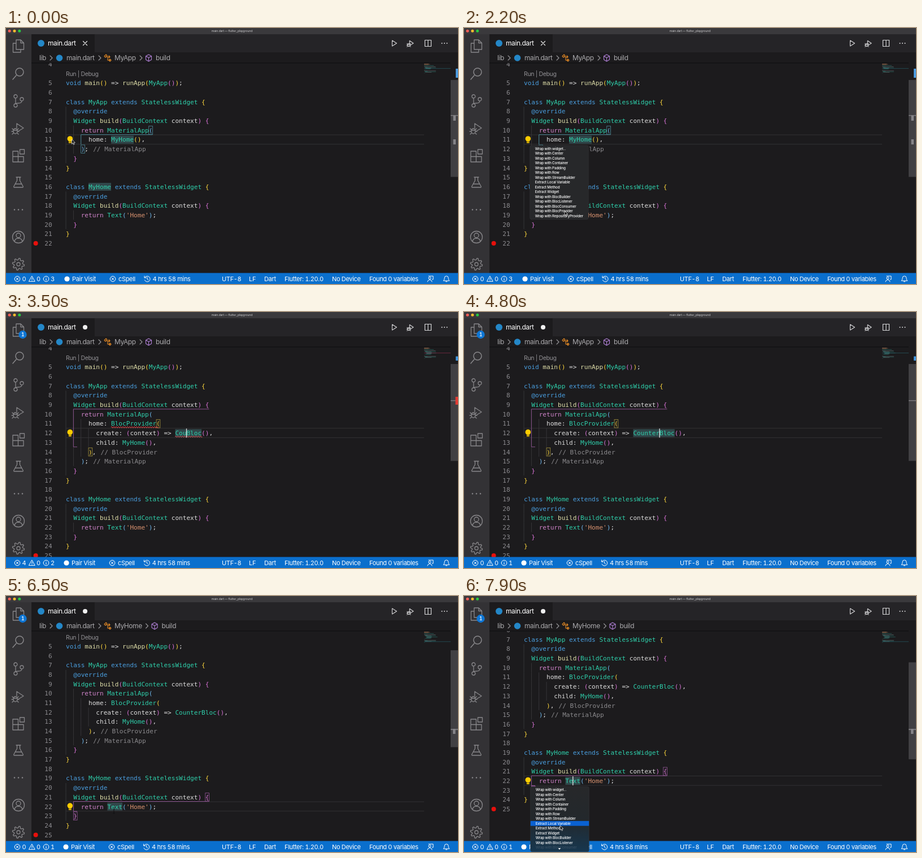
An HTML page that plays this animation: 800x453 px, repeating every 8000 ms.

```html
<!DOCTYPE html>
<html lang="en">
<head>
<meta charset="utf-8">
<title>Editor: wrap a widget</title>
<style>
  html, body { margin: 0; width: 100%; height: 100%; overflow: hidden; background: #1c1b1d; }
  svg { display: block; width: 100%; height: 100%; }
  text { white-space: pre; }
  .ui { font-family: Inter, "Open Sans", sans-serif; letter-spacing: -.03em; font-variant-numeric: tabular-nums; }
  .code { font: 11.08px "DejaVu Sans Mono", "Liberation Mono", monospace; }
  .line { fill: none; stroke-linecap: round; stroke-linejoin: round; }
</style>
</head>
<body>
<svg viewBox="0 0 800 453" preserveAspectRatio="none">
  <defs>
    <clipPath id="view"><rect x="45" y="62" width="755" height="372"/></clipPath>
    <linearGradient id="veil" x1="0" y1="0" x2="0" y2="1">
      <stop offset="0" stop-color="#27282a"/>
      <stop offset=".5" stop-color="#23282c"/>
      <stop offset="1" stop-color="#17374f"/>
    </linearGradient>
  </defs>
  <g id="chrome"></g>
  <g id="tab"></g>
  <g id="editor" clip-path="url(#view)"></g>
  <g id="status"></g>
  <g id="overlay"></g>
</svg>
<script>
const LOOP = 8000, STEP = 100;
const LEFT = 106, CH = 6.67, ROW = 16.68;
const WRAP = 2500, CLICK = 5900;
const GREY = '#88878a', LIGHT = '#d6d6d8';
const PAIRS = ['#ffd83d', '#d873d6', '#6fb8ee'];
const $ = id => document.getElementById(id);
const esc = s => s.replace(/&/g, '&amp;').replace(/</g, '&lt;').replace(/>/g, '&gt;');

const rect = (x, y, w, h, fill, more = '') =>
  `<rect x="${x}" y="${y}" width="${w}" height="${h}" fill="${fill}" ${more}/>`;
const dot = (x, y, r, fill) => `<circle cx="${x}" cy="${y}" r="${r}" fill="${fill}"/>`;
const ui = (x, y, s, size = 11.9, fill = LIGHT, more = '') =>
  `<text class="ui" x="${x}" y="${y + size * .36}" font-size="${size}" fill="${fill}" ${more}>${esc(s)}</text>`;
const code = (x, y, s, fill, more = '') =>
  `<text class="code" x="${x}" y="${y + 3.9}" fill="${fill}" ${more}>${esc(s)}</text>`;
// Stroked icon centred on x, y
const icon = (x, y, d, stroke = GREY, w = 1.3) =>
  `<path class="line" transform="translate(${x} ${y})" d="${d}" stroke="${stroke}" stroke-width="${w}"/>`;
const ring = r => `M${-r} 0a${r} ${r} 0 1 0 ${2 * r} 0a${r} ${r} 0 1 0 ${-2 * r} 0`;
const chevron = (x, y) => icon(x, y, 'M-2-4L2 0L-2 4', '#97969a', 1.1);

function gear(r, R, teeth) {
  let d = '';
  for (let i = 0; i < teeth * 4; i++) {
    const a = (i + .5) * Math.PI / teeth / 2, q = i % 4 < 2 ? R : r;
    d += (i ? 'L' : 'M') + (q * Math.cos(a)).toFixed(2) + ' ' + (q * Math.sin(a)).toFixed(2);
  }
  return d + 'z';
}

function drawChrome() {
  const bug = 'M-3-8L9 0L-1 6M-3-8V0' + 'M-9 5a3.5 4 0 1 1 7 0v1a3.5 4 0 1 1-7 0zM-9 4h7M-11 1l2 2M0 1l-2 2M-12 6h3M-2 6h3M-11 11l2-2M0 11l-2-2';
  $('chrome').innerHTML =
    rect(0, 0, 800, 453, '#1c1b1d') +
    rect(0, 11, 800, 32, '#252427') + rect(45, 11, 112, 32, '#1c1b1d') +
    rect(0, 0, 800, 11, '#3a393c') + rect(0, 11, 45, 423, '#333235') +
    rect(45, 61.3, 742, 1.2, '#111012') +
    dot(6.2, 5.3, 2.5, '#ff5f57') + dot(15, 5.3, 2.5, '#febc2e') + dot(23.8, 5.3, 2.5, '#28c840') +
    ui(400, 5.4, 'main.dart — flutter_playground', 5.3, '#c9c9cb', 'text-anchor="middle"') +
    icon(22, 32, 'M-4-5V-11H4L9.5-5.5V6H-4zM4-11V-5.5H9.5M-4-5H-9.5V11H4V6') +
    icon(22, 81, 'M-4 3L-10 10M-5-3a7 7 0 1 1 14 0a7 7 0 1 1-14 0', GREY, 1.5) +
    icon(22, 128, 'M-5-4V6M-8-7a3 3 0 1 1 6 0a3 3 0 1 1-6 0M-8 9a3 3 0 1 1 6 0a3 3 0 1 1-6 0M3-2a3 3 0 1 1 6 0a3 3 0 1 1-6 0M6 1Q6 5 0 5Q-5 5-5 6') +
    icon(22, 177, bug) +
    icon(22, 226, 'M-10-8H-.5V1.5H9V11H-10zM-10 1.5H-.5V11M2.5-11H10.5V-3H2.5z') +
    icon(22, 273, 'M-4-9H4M-2.5-9V-3L-8 7Q-9 9-7 9H7Q9 9 8 7L2.5-3V-9M-5.5 3H5.5') +
    [-7, 0, 7].map(d => dot(22 + d, 321.5, 1.25, GREY)).join('') +
    icon(22, 370, ring(10.5) + 'M-4-3a4 4 0 1 1 8 0a4 4 0 1 1-8 0M-7 8Q-6 2 0 2Q6 2 7 8') +
    icon(22, 418, gear(7.6, 10.6, 8) + ring(3)) +
    dot(62, 27, 6, '#2487c7') + ui(74, 27, 'main.dart', 11.9, '#fff') +
    icon(687, 27, 'M-3.5-5L4.5 0L-3.5 5z', LIGHT, 1.1) +
    `<g transform="translate(716 27) scale(.56)">${icon(0, 0, bug, LIGHT, 2)}</g>` +
    icon(747, 27, 'M-5.5-5.5H5.5V5.5H-5.5zM0-5.5V5.5', LIGHT, 1.2) +
    [-4.5, 0, 4.5].map(d => dot(776 + d, 27, 1, LIGHT)).join('');
}

function drawTab(s) {
  const shift = s.clicked ? 10.5 : 0;
  $('tab').innerHTML =
    (s.wrapped
      ? dot(140, 27, 4, '#f0f0f0') + dot(29.5, 40, 7.2, '#0f76d4') +
        ui(29.5, 40, '1', 8.5, '#fff', 'text-anchor="middle" font-weight="600"')
      : icon(140, 27, 'M-3.5-3.5L3.5 3.5M3.5-3.5L-3.5 3.5', '#e8e8e8', 1.2)) +
    ui(59, 53, 'lib', 11.9, '#aaa9ac') + chevron(80, 53) +
    dot(94.5, 53, 5.8, '#2487c7') + ui(107, 53, 'main.dart', 11.9, '#aaa9ac') + chevron(166, 53) +
    icon(179, 53, 'M-5-3L-2-6L0-4L-3-1zM-1-2H5M1-2V4H5M3-4L5-2L3 0M5 2L7 4L5 6L3 4z', '#e58a25', 1.1) +
    ui(192, 53, s.clicked ? 'MyHome' : 'MyApp', 11.9, '#aaa9ac') + chevron(239 + shift, 53) +
    icon(252.5 + shift, 53, 'M0-6L5-3.2V3L0 6L-5 3V-3.2zM-5-3.2L0-.5L5-3.2M0-.5V6', '#b180d7', 1.1) +
    ui(265 + shift, 53, 'build', 11.9, '#aaa9ac');
}

function source(s) {
  const body = s.wrapped
    ? ['      home: BlocProvider(',
       `        create: (context) => ${s.name}Bloc(),`,
       '        child: MyHome(),',
       '      ), // BlocProvider']
    : ['      home: MyHome(),'];
  const widget = name => [`class ${name} extends StatelessWidget {`, '  @override', '  Widget build(BuildContext context) {'];
  return ['void main() => runApp(MyApp());', '', ...widget('MyApp'), '    return MaterialApp(', ...body,
    '    ); // MaterialApp', '  }', '}', '', ...widget('MyHome'), "    return Text('Home');", '  }', '}', ''];
}

const KEYWORDS = new Set(['void', 'class', 'extends']);
const CALLS = new Set(['main', 'runApp', 'build']);
function colour(w) {
  if (w.startsWith('//')) return '#8b8a8d';
  if (w[0] === "'") return '#d8926f';
  if (w === 'return') return '#d285cc';
  if (w[0] === '@' || KEYWORDS.has(w)) return '#4a9fe0';
  if (CALLS.has(w)) return '#e0dfaa';
  return /^[A-Z]/.test(w) ? '#2fd0ac' : '#dcdcdc';
}

const col = n => LEFT + n * CH;
const lineY = (n, scroll) => (n < 5 ? 64.2 : 97.5 + (n - 5) * ROW) - scroll;

function drawCode(lines, scroll) {
  let out = '', depth = 0;
  lines.forEach((text, i) => {
    const n = i + 5, y = lineY(n, scroll), indent = text.search(/\S/);
    for (let k = 0; k < indent; k += 2)
      out += rect(col(k) - .4, y - ROW / 2, .8, ROW, '#3d3c3f');
    out += code(81.7, y, String(n), '#8d8c90', 'text-anchor="end"');
    for (const m of text.matchAll(/\/\/.*|'[^']*'|@?\w+|[(){}]|[^\s\w(){}]+/g)) {
      const w = m[0];
      let fill = colour(w);
      if ('({'.includes(w)) fill = PAIRS[depth++ % 3];
      if (')}'.includes(w)) fill = PAIRS[--depth % 3];
      out += code(col(m.index) + (w.startsWith('//') ? 1.5 : 0), y, w, fill);
    }
  });
  return out;
}

const mark = (c, len, y) => rect(col(c), y - 7, len * CH, 14, '#30474a');
const frame = (c, y, stroke) => rect(col(c), y - 7.3, CH, 14.6, 'none', `stroke="${stroke}" stroke-width=".8"`);
const path = (d, stroke, w = .9) => `<path d="${d}" fill="none" stroke="${stroke}" stroke-width="${w}"/>`;
function squiggle(x, w, y) {
  let d = `M${x} ${y}`;
  for (let k = 0; k < w / 4; k++) d += 'q1-2.4 2 0t2 0';
  return path(d, '#f14c4c', 1);
}
const bulb = y =>
  `<g transform="translate(113.3 ${y})">` + dot(0, -1.6, 4.8, '#ffcc00') + rect(-2.4, 1.5, 4.8, 4.5, '#ffcc00') +
  rect(-2.4, 3.3, 4.8, .8, '#3a3520') + '</g>';

function minimap(lines, s) {
  const all = ['import material', 'import flutter_bloc', 'import counter', '', ...lines];
  let out = '';
  all.forEach((l, i) => {
    const k = Math.max(0, l.search(/\S/)), y = 63 + i * .83;
    out += rect(740 + k * .55, y, l.trim().length * .55, .6, i < 3 ? '#b0805c' : i % 3 ? '#2b8f85' : '#7b8187', 'opacity=".75"');
  });
  const y = 63 + (s.line - 1) * .83;
  return out + rect(740, y, 47, .8, s.errors ? '#b5355d' : '#2b7a88', 'opacity=".6"');
}

function ruler(s) {
  const top = 92 + s.scroll * .47;
  let out = rect(787, top, 13, 171.5, '#414043');
  if (s.clicked)
    return out + rect(787, 235, 13, 2.2, '#77767a') + rect(791, 235, 4.5, 9, '#858488');
  if (s.wrapped)
    return out + rect(796, 78.5, 4, 7.5, '#3f94dc') + rect(787, 156, 13, 1.6, '#77767a') +
      (s.errors ? rect(795.5, 150, 4.5, 14, '#e23b34') : '');
  return out + rect(796, 72, 4, 16, '#4b9be0') + rect(787, 154, 13, 1.6, '#77767a') +
    rect(791.5, 155, 4.5, 9, '#858488') + rect(791.5, 197, 4.5, 9, '#858488');
}

function drawEditor(s) {
  const lines = source(s), at = n => lineY(n, s.scroll), y = at(s.line);
  let out = rect(LEFT, y - 9, 634, .9, '#343336') + rect(LEFT, y + 7.6, 634, .9, '#343336');
  let marks = '', caret;

  if (s.clicked) {
    const a = at(21), p = '#96589a';
    out += mark(11, 4, y);
    marks = path(`M${col(38)} ${a + 7.6}H${col(2)}V${y + 8.4}H${col(3)}`, p) + frame(37, a, p) + frame(2, at(23), p);
    caret = 13;
  } else if (s.wrapped) {
    const p = '#96589a', g = '#a8963f', len = s.name.length + 4;
    out += mark(29, s.selected ? s.name.length : len, y);
    marks = path(`M${col(38)} ${at(9) + 7.6}H${col(2)}V${at(13) + 7.8}H${col(3)}`, p) +
      frame(24, at(11), g) + frame(6, at(14), g);
    if (s.errors) marks += squiggle(col(12), 12 * CH, at(11) + 6.4) + squiggle(col(29), len * CH, y + 6.4);
    caret = 29 + s.name.length;
  } else {
    const p = '#4f8f9f';
    out += mark(12, 6, y) + mark(6, 6, at(16));
    marks = path(`M${col(23)} ${at(10) + 7.8}H${col(4)}V${y + 8.4}`, p) + frame(22, at(10), p) + frame(4, at(12), p);
    caret = 13;
  }
  out += code(81.7, at(4), '4', '#8d8c90', 'text-anchor="end"') +
    ui(LEFT, 81.3 - s.scroll, 'Run | Debug', 10.5, '#929195') +
    drawCode(lines, s.scroll) + marks;
  if (s.caret) out += rect(col(caret) - .6, y - 8, 1.3, 16, '#e4e4e4');
  if (s.bulb) out += bulb(y);
  out += dot(52.6, at(lines.length + 4), 4, '#e8100c') + minimap(lines, s) + ruler(s);
  $('editor').innerHTML = out;
}

function drawStatus(s) {
  const W = '#fff', dx = s.infos - 3, put = (x, str) => ui(x, 444, str, 11, W);
  const sign = (x, d) => icon(x, 444, d, W, 1);
  const cross = ring(4.8) + 'M-2-2L2 2M2-2L-2 2';
  $('status').innerHTML = rect(0, 433.5, 800, 19.5, '#0a6fcd') +
    sign(20, cross) + put(28.5, String(s.errors)) +
    sign(46, 'M0-4.8L5.2 4.4H-5.2zM0-1.6V1.4M0 3V3.1') + put(54, '0') +
    sign(71, ring(4.8) + 'M0-.5V2.6M0-2.6V-2.5') + put(79, String(s.infos)) +
    dot(108 + dx, 444, 4.6, W) + put(117 + dx, 'Pair Visit') +
    sign(189 + dx, cross) + put(199 + dx, 'cSpell') +
    sign(250 + dx * .7, 'M-4.4-2.2A5 5 0 1 1-4.6 2M-5-5V-2H-2M0-2.6V.4L2 1.8') + put(259.5 + dx * .7, '4 hrs 58 mins') +
    put(382, 'UTF-8') + put(430, 'LF') + put(457, 'Dart') + put(493, 'Flutter: 1.20.0') +
    put(577, 'No Device') + put(643, 'Found 0 variables') +
    sign(751, 'M-3-1.5a2 2 0 1 1 4 0a2 2 0 1 1-4 0M-5 5Q-4.5 1.5-1 1.5Q2.5 1.5 3 5M-3-5H5V1H3.5') +
    sign(779.5, 'M-5 3Q-3.4 1.5-3.4-1.5A3.4 3.6 0 0 1 3.4-1.5Q3.4 1.5 5 3zM-1.2 4.8H1.2');
}

const MENU = ['widget...', 'Center', 'Column', 'Container', 'Padding', 'Row', 'StreamBuilder',
  'Extract Local Variable', 'Extract Method', 'Extract Widget',
  'BlocBuilder', 'BlocListener', 'BlocConsumer', 'BlocProvider', 'RepositoryProvider']
  .map(m => m.startsWith('Extract') ? m : 'Wrap with ' + m);
const PITCH = 8.49;

// A cut menu runs over the status bar and ends in a scroll arrow
function drawMenu(x, y, h, active, cut) {
  let out = rect(x, y, 103.5, h, cut ? 'url(#veil)' : '#27282a', 'rx="2.6" stroke="#3b3c3f" stroke-width=".5"');
  MENU.slice(0, cut ? 12 : 15).forEach((m, i) => {
    const cy = y + 5.6 + i * PITCH;
    if (i === active) out += rect(x, cy - 4.3, 103.5, 8.6, '#0a62d2');
    out += ui(x + 9, cy, m, 6.35, '#fff', 'font-weight="500"');
  });
  if (cut) out += ui(x + 9, y + 107.4, MENU[12], 6.35, '#7d8a98', 'font-weight="500" opacity=".3"') +
    `<path d="M${x + 49} ${y + 108.5}h4.4l-2.2 3z" fill="#fff"/>`;
  return out;
}

// time, x, y
const MOUSE = [[0, 116.5, 197], [300, 117, 198], [500, 132, 225], [800, 161, 282], [1200, 170, 309], [1600, 174, 323],
  [4700, 215, 330], [5000, 215, 330], [5700, 191, 381], [6500, 191, 381], [7000, 117, 327], [7300, 117, 327],
  [7500, 138, 356], [7900, 170, 406], [LOOP, 170, 406]];
function mouseAt(t) {
  const i = MOUSE.findIndex(k => k[0] > t), a = MOUSE[i - 1], b = MOUSE[i];
  const u = (t - a[0]) / (b[0] - a[0]), e = u * u * (3 - 2 * u);
  return [a[1] + (b[1] - a[1]) * e, a[2] + (b[2] - a[2]) * e];
}

function drawOverlay(t) {
  const [x, y] = mouseAt(t), first = t >= 300 && t < 2300, second = t >= 7300;
  const row = top => Math.floor((y - top - 1.3) / PITCH);
  let out = '';
  if (first) out += drawMenu(116.7, 207.9, 130.5, t >= 2200 ? -1 : row(207.9), false);
  if (second) out += drawMenu(117.7, 337.4, 115, row(337.4), true);
  if (t < 2400 || t >= 6900)
    out += `<path transform="translate(${x} ${y})" d="M0 0V8.2L1.9 6.4L3.2 9.3L4.5 8.7L3.2 5.9H5.8z" fill="#111" stroke="#fff" stroke-width=".7"/>`;
  else if (t < 3000 || t >= 5000)
    out += icon(x, y, 'M-1.5-4Q0-4 0-3V3Q0 4-1.5 4M1.5-4Q0-4 0-3M0 3Q0 4 1.5 4', '#101012', 1);
  $('overlay').innerHTML = out;
}

function stateAt(t) {
  const wrapped = t >= WRAP, clicked = t >= CLICK;
  const typed = Math.max(0, Math.min(7, Math.floor((t - 3200) / 150) + 1));
  const u = Math.max(0, Math.min(1, (t - 6400) / 400));
  const errors = wrapped && t < 4500 ? 4 : 0;
  return {
    wrapped, clicked, errors,
    name: typed ? 'Counter'.slice(0, typed) : 'Subject',
    selected: !typed,
    line: clicked ? 22 : wrapped ? 12 : 11,
    scroll: 54 * u * u * (3 - 2 * u),
    infos: errors ? 2 : wrapped ? 1 : 3,
    bulb: !wrapped || t >= 2800 && t < CLICK || t >= 6100,
    caret: clicked ? (t - CLICK) % 1000 < 500 : t >= 3200 && t < 4400 || t % 1000 >= 500
  };
}

let last = -1, shown = '';
function draw(t) {
  if (t === last) return;
  last = t;
  const s = stateAt(t), key = JSON.stringify(s);
  if (key !== shown) {
    shown = key;
    drawTab(s);
    drawEditor(s);
    drawStatus(s);
  }
  drawOverlay(t);
}

const start = performance.now();
function tick() {
  draw(Math.floor((performance.now() - start) % LOOP / STEP) * STEP);
  requestAnimationFrame(tick);
}

drawChrome();
tick();
</script>
</body>
</html>
```
